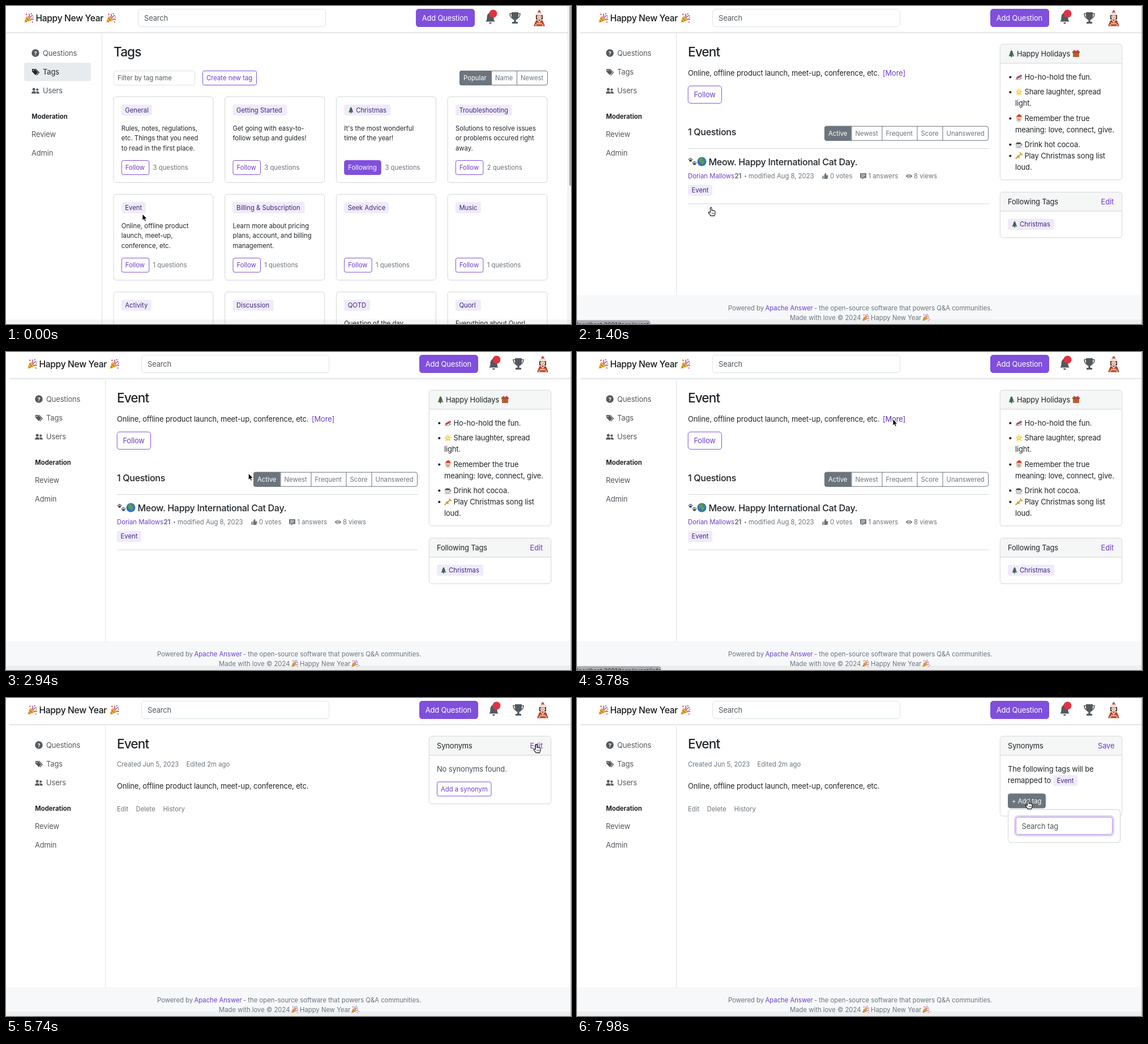
Animation, 998 px wide and 561 px high, one loop 8000 ms. Source, as an HTML page:

```html
<!DOCTYPE html>
<html lang="en">
<head>
<meta charset="utf-8">
<title>Tags and synonyms</title>
<style>
html, body { margin: 0; width: 100%; height: 100%; overflow: hidden; background: #fff; }
svg { display: block; width: 100vw; height: 100vh; font-family: Inter, "Liberation Sans", sans-serif; }
text { white-space: pre; }
</style>
</head>
<body>
<svg id="stage" viewBox="0 0 998 561"></svg>
<script>
const INK = '#212529', GRAY = '#6c757d', NAV = '#54595e', PURPLE = '#7f4fdd', LINK = '#6f3ccb',
  LINE = '#d3d5d7', CHIP = '#f0ebfb', CHIP_INK = '#43277a';
const S = 11.3, M = 12.95, L = 16.1, XL = 22.6;   // text sizes

// ---- drawing helpers ----
const text = (x, y, s, size = M, fill = INK, weight = 400) => {
  const gap = size > 20 ? -.04 : size > 15 ? -.021 : size > 12 ? -.011 : 0;
  return `<text x="${x}" y="${y}" font-size="${size}" fill="${fill}" font-weight="${weight}" letter-spacing="${gap * size}">${s.replace(/&/g, '&amp;')}</text>`;
};
const rect = (x, y, w, h, fill = 'none', stroke = 'none', r = 0, extra = '') =>
  `<rect x="${x}" y="${y}" width="${w}" height="${h}" rx="${r}" fill="${fill}" stroke="${stroke}" ${extra}/>`;
const path = (d, fill = 'none', stroke = 'none', w = 1) =>
  `<path d="${d}" fill="${fill}" stroke="${stroke}" stroke-width="${w}"/>`;
const dot = (x, y, r, fill) => `<circle cx="${x}" cy="${y}" r="${r}" fill="${fill}"/>`;
const at = (x, y, body, k = 1) => `<g transform="translate(${x} ${y}) scale(${k})">${body}</g>`;
const group = (id, body) => `<g id="${id}">${body}</g>`;
const hline = (x, y, w) => rect(x, y, w, 1, LINE);
const chip = (x, y, w, s, inset = 6.5) =>
  rect(x, y, w, 19.5, CHIP, 'none', 3) + text(x + inset, y + 13.7, s, S, CHIP_INK);
const button = (x, y, w, h, s, size = S, full = false) =>
  rect(x + .5, y + .5, w - 1, h - 1, full ? PURPLE : '#fff', PURPLE, size > S ? 4.6 : 3.2) +
  text(x + (size > S ? 10.7 : 7), y + h / 2 + size * .365, s, size, full ? '#fff' : LINK);
const tabs = (y, edges, labels) => {
  const x = edges[0], w = edges[edges.length - 1] - x;
  return rect(x + .5, y + .5, w - 1, 25, '#fff', GRAY, 3.5) +
    path(`M${edges[1]} ${y}H${x + 4}q-4 0-4 4v18q0 4 4 4H${edges[1]}z`, GRAY) +
    labels.map((s, i) => (i ? rect(edges[i], y, 1, 26, GRAY) : '') +
      text(edges[i] + 7, y + 17, s, S, i ? GRAY : '#fff')).join('');
};
const panel = (y, h, head, link, x) =>
  rect(747.3, y + .3, 215.4, h, '#fff', LINE, 5) +
  path(`M747.8 ${y + 34}V${y + 6}q0-5 5-5h204.4q5 0 5 5v28z`, '#f5f6f6') + hline(748, y + 33.5, 215) +
  text(head === 'Happy Holidays' ? 777 : 761, y + 22, head) + (link ? text(x, y + 22, link, M, LINK) : '');

// ---- small pictures, about 16 px, centred on 0,0 ----
const popper = path('M-8 8L-4-3Q2-1 4 4z', '#eeb03a') + path('M-6.5 4l3 3M-5 0l5 5', 'none', '#b9722a', 1.5) +
  path('M-1-1Q2-3 0-7M1 1Q3-4 7-4M3 3Q5 1 8 3', 'none', '#b5508f', 1.5) +
  dot(-4, -6, 1.2, '#e4483f') + dot(4, -7, 1.2, '#3c9bd8') + dot(7, -1, 1.1, '#58b35a') + dot(6, 7, 1.1, '#e4483f');
const tree = path('M0-6.5L2.6-2.5H1.7L3.8.7H2.7L5 4.5H-5L-2.7.7H-3.8L-1.7-2.5H-2.6z', '#2f6b4e') + rect(-1, 4, 2, 2.5, '#80532f') +
  dot(-1, 0, .7, '#e15a4b') + dot(2, 3, .7, '#f4c84c') + dot(0, -6, .9, '#f4c84c');
const gift = rect(-5.5, -2, 11, 8, '#b0692f') + rect(-6.3, -4, 12.6, 3, '#8f5224') + rect(-1.3, -4, 2.6, 10, '#dc3d3d') +
  path('M0-4Q-5-8-4-4zM0-4Q5-8 4-4z', '#dc3d3d', '#dc3d3d');
const sled = path('M-5 1L4-4L6-1L-3 4z', '#c54a42') + path('M-6 4L0 5L6 2M-4 1v4M3-2v5', 'none', '#8494a5', 1.2);
const star = path('M-5-5L5 5M5-5L-5 5M0-7V7M-7 0H7', 'none', '#fbe08a', 1.2) +
  path('M0-5.5L1.8-1.8L5.6-1.2L2.7 1.4L3.6 5.2L0 3.2L-3.6 5.2L-2.7 1.4L-5.6-1.2L-1.8-1.8z', '#f9cb42') + dot(0, 0, 2, '#fff0a3');
const santa = dot(0, 2, 5, '#e3d6cc') + dot(0, 1, 3, '#e3a878') + path('M-5-1Q-3-7 1-7Q5-6 5-1z', '#d8402f') +
  rect(-5.5, -2, 11, 2, '#f3e3d4', '#cfa98a', 1, 'stroke-width=".5"') + path('M-2 3H2', 'none', '#b57c5d');
const cocoa = path('M-5-2H4V1Q4 5 0 5Q-5 5-5 1z', '#d9dadd', '#85888e', .8) + path('M4-1Q8 0 3 3', 'none', '#85888e', 1.2) +
  `<ellipse cx="-.5" cy="-2" rx="4.2" ry="1.6" fill="#5d3828"/>` + path('M-6 6H6', 'none', '#a5a8ae');
const horn = path('M-6 5L3-3L2-6L7-1L4-2L-5 6z', '#d9a72f', '#b88721', .7) + path('M-3 0L1 4', 'none', '#c8942a', 2);
const paws = [[-3.5, -3], [3.5, 3]].map(([x, y]) => at(x, y,
  `<ellipse cy="1.3" rx="2.5" ry="2" fill="#45474a"/>` +
  [[-3, -.7], [-1, -2.4], [1, -2.4], [3, -.7]].map(p => dot(...p, 1, '#45474a')).join(''))).join('');
const globe = dot(0, 0, 8, '#2f74c4') + path('M-3-6Q0-7 3-5L1-3L4-1L4 2L1 6L-1 2L-4 1L-5-3z', '#5f9d4c') + path('M4-5L6-2L4-2z', '#5f9d4c');
const avatar = path('M-6 2V-6Q0-13 6-6V2z', '#2a2426') + dot(0, -2, 4.6, '#f3d1b8') + path('M-5-3Q-4-7 0-7Q4-7 5-3L3-5H-3z', '#2a2426') +
  path('M-5.5-7L-1-14.5H1.5L5.5-7z', '#e9e1df') + path('M-3-10L-1-14H1L3-10z', '#d4483c') + rect(-6.5, -8, 13, 2.5, '#f4eeee', '#d9cdcd', 1.2, 'stroke-width=".5"') +
  path('M-6 4Q0 1 6 4L10 14H-10z', '#b93d35') + path('M-3 3L0 7L3 3', 'none', '#f4e3cf', 1.4) + rect(-5, 8, 10, 3, '#e6b25a') +
  dot(-1.8, -2, .6, '#333') + dot(1.8, -2, .6, '#333') + path('M-1 .5H1', 'none', '#cc6258', .8) +
  dot(-6, 12, 1.2, '#f0d5b5') + dot(6, 12, 1.2, '#f0d5b5');
const bell = path('M0-9.5Q6-8 6-1Q6 5 8.5 6.5H-8.5Q-6 5-6-1Q-6-8 0-9.5zM-2.6 8H2.6Q2 10.4 0 10.4Q-2 10.4-2.6 8z', NAV);
const trophy = path('M-6-10H6V-3Q6 3 0 4Q-6 3-6-3zM-1.7 3h3.4v5h-3.4zM-5 7H5V10H-5z', NAV) +
  path('M-6-7.5H-9Q-8.5-.5-4 .5M6-7.5H9Q8.5-.5 4 .5', 'none', NAV, 1.6);
const help = dot(0, 0, 6.7, NAV) + text(-2.6, 3.6, '?', 9.5, '#fff', 700);
const label = c => path('M-6-5.5H-1.5L4.5 .5L0 5.5L-6-.8z', c) + dot(-3.5, -3, 1, '#fff') + path('M0-5.5L6.4 .7L2 5.5', 'none', c, 1.2);
const people = dot(-2.8, -2.4, 2.5, NAV) + dot(3.2, -2, 2.1, NAV) + path('M-7 5Q-6.5 .8-2.8 .8Q1 .8 1.3 5zM2 5Q2 2.5 1 1.2Q6.5 0 7 5z', NAV);
const thumb = path('M-5-.5H-3V5H-5zM-2-1L0-5.5Q2.5-5.5 1.7-1.5H4.5Q5.5-1 5 .5L3.8 5H-2z', GRAY);
const chat = path('M-5.5-5H5.5V3.5H1L-2 6V3.5H-5.5z', GRAY) + path('M-3.5-2.5H3.5M-3.5-.5H3.5M-3.5 1.5H1', 'none', '#fff', .8);
const eye = path('M-6 0Q0-7 6 0Q0 7-6 0z', GRAY) + dot(0, 0, 2.6, '#fff') + dot(0, 0, 1.5, GRAY);

// ---- page parts ----
const frame = (onTags, foot) =>
  rect(169, 46, 1, foot - 46, '#dfe1e3') + rect(0, 46, 998, 1, '#dcdddf') + rect(0, 47, 998, 2, '#f4f4f4') +
  at(40.5, 21, popper, 1.05) + text(52.5, 26.8, 'Happy New Year', 15.6, '#16181a', 500) + at(185.5, 21, popper, 1.05) +
  rect(233.5, 5.5, 331, 31, '#fff', '#dee2e6', 4.5) + text(244, 26, 'Search', M, NAV) +
  button(724, 5, 104, 32, 'Add Question', M, true) +
  at(855.5, 21, bell) + dot(860.5, 13.5, 7, '#dc3545') + at(899, 21, trophy) + at(942, 21.5, avatar) +
  (onTags ? rect(32, 100, 118, 32.5, '#e8ebee', 'none', 4) : '') +
  at(52, 83, help) + text(65, 88, 'Questions', M, NAV) +
  at(52, 116.5, label(onTags ? INK : NAV)) + text(65, 121, 'Tags', M, onTags ? INK : NAV) +
  at(52, 149.5, people) + text(65, 154, 'Users', M, NAV) +
  text(45.3, 199, 'Moderation', S, INK, 700) + text(45, 231, 'Review', M, NAV) + text(45, 264, 'Admin', M, NAV);

const cards = [
  ['General', 54, 3, 'Rules, notes, regulations,', 'etc. Things that you need', 'to read in the first place.'],
  ['Getting Started', 96, 3, 'Get going with easy-to-', 'follow setup and guides!'],
  ['Christmas', 82, 3, 'It\'s the most wonderful', 'time of the year!'],
  ['Troubleshooting', 100, 2, 'Solutions to resolve issues', 'or problems occured right', 'away.'],
  ['Event', 43, 1, 'Online, offline product', 'launch, meet-up,', 'conference, etc.'],
  ['Billing & Subscription', 127, 1, 'Learn more about pricing', 'plans, account, and billing', 'management.'],
  ['Seek Advice', 79, 1], ['Music', 45, 1], ['Activity', 53, 1], ['Discussion', 72, 1],
  ['QOTD', 46, 1, 'Question of the day'], ['Quorl', 45, 1, 'Everything about Quorl']];
const card = ([name, w, n, ...lines], i) => {
  const x = 190 + i % 4 * 196.7, y = 160 + (i >> 2) * 172.2, on = name === 'Christmas';
  return rect(x, y, 176, 151.5, '#fff', LINE, 5) + chip(x + 13.8, y + 13.8, w, name, on ? 21 : 6.5) +
    (on ? at(x + 26, y + 23.5, tree, .88) : '') +
    lines.map((s, k) => text(x + 13.8, y + 59.8 + 17.4 * k, s, S)).join('') +
    button(x + 13.8, y + 112, on ? 65.5 : 49.5, 26, on ? 'Following' : 'Follow', S, on) +
    text(x + (on ? 86 : 69.6), y + 129.2, n + ' questions', S, GRAY);
};

const tagsPage = frame(true, 561) + text(190, 89, 'Tags', XL, INK, 500) +
  rect(190.5, 114.5, 143, 25, '#fff', '#dee2e6', 3.5) + text(197, 131, 'Filter by tag name', S, NAV) +
  button(347, 114, 96, 26, 'Create new tag') + tabs(114, [801, 857, 902, 957], ['Popular', 'Name', 'Newest']) +
  cards.map(card).join('') +
  group('eventHover', rect(203.8, 346, 43, 19.5, '#e0d6f5', 'none', 3) + text(210.3, 359.7, 'Event', S, CHIP_INK)) +
  rect(992, 0, 6, 561, '#f6f6f6') + rect(992, 0, 1, 561, '#e4e4e4') + rect(995, 0, 3, 317, '#a9a9a9', 'none', 1.5);

const footer = rect(0, 510, 998, 51, '#f6f8fa') +
  text(267, 536.5, 'Powered by', S, GRAY) + text(332.5, 536.5, 'Apache Answer', S, LINK) +
  text(419, 536.5, '- the open-source software that powers Q&A communities.', S, GRAY) +
  text(376, 553.5, 'Made with love © 2024', S, GRAY) + at(510, 549.5, popper, .75) +
  text(519, 553.5, 'Happy New Year', S, GRAY) + at(616, 549.5, popper, .75) + text(622, 553.5, '.', S, GRAY);
const shell = at(6, 0, frame(false, 510)) + footer + rect(997, 0, 1, 561, '#b9b9b9') +
  text(196, 89, 'Event', XL, INK, 500);
const about = 'Online, offline product launch, meet-up, conference, etc.';

const bullets = [[125, sled, 'Ho-ho-hold the fun.'], [151.5, star, 'Share laughter, spread', 'light.'],
  [198, santa, 'Remember the true', 'meaning: love, connect, give.'], [244, cocoa, 'Drink hot cocoa.'],
  [264, horn, 'Play Christmas song list', 'loud.']];
const eventPage = text(196, 122.5, about) +
  `<g id="more">${text(540, 122.5, '[More]', M, 'currentColor')}</g>` +
  button(195.7, 140.5, 60.3, 31.7, 'Follow', M) + text(196, 228, '1 Questions', L, INK, 500) +
  tabs(211.7, [437, 484.5, 538.5, 600.5, 645.5, 727], ['Active', 'Newest', 'Frequent', 'Score', 'Unanswered']) +
  hline(196, 251, 531) + at(204, 274.5, paws) + at(220.5, 274.5, globe) +
  text(232.5, 281, 'Meow. Happy International Cat Day.', L, INK, 500) +
  text(196, 304, 'Dorian Mallows', S, LINK) + text(278.5, 304, '21', S, GRAY, 700) + dot(297.5, 300.5, 1.2, GRAY) +
  text(303, 304, 'modified Aug 8, 2023', S, GRAY) + at(438.5, 300, thumb) + text(447, 304, '0 votes', S, GRAY) +
  at(505.5, 300, chat) + text(514.5, 304, '1 answers', S, GRAY) + at(586.5, 300, eye) + text(595, 304, '8 views', S, GRAY) +
  chip(196, 315.5, 43, 'Event') + hline(196, 348.5, 531) +
  panel(67, 239.5, 'Happy Holidays') + at(767.5, 84, tree) + at(881.5, 84, gift) +
  bullets.map(([y, pic, a, b]) => dot(765.3, y + .5, 2.1, INK) + at(780.5, y, pic) + text(790.5, y + 4.7, a) +
    (b ? text(774, y + 24.7, b) : '')).join('') +
  panel(328, 80.5, 'Following Tags', 'Edit', 925.5) + chip(761, 375.3, 82, 'Christmas', 21) + at(773, 385, tree, .88);

const infoPage = text(196, 120.5, 'Created Jun 5, 2023', S, GRAY) + text(318.5, 120.5, 'Edited 2m ago', S, GRAY) +
  text(196, 160, about) + text(196, 200, 'Edit', S, GRAY) + text(229.5, 200, 'Delete', S, GRAY) + text(277.5, 199.7, 'History', S, GRAY);
const synonyms = panel(67, 119.5, 'Synonyms', 'Edit', 925.5) + text(761, 129.7, 'No synonyms found.', M, '#4a4f54') +
  button(761, 147.5, 96.5, 26, 'Add a synonym');
const editing = panel(67, 141, 'Synonyms', 'Save', 920) + text(761, 129.7, 'The following tags will be') +
  text(761, 149.7, 'remapped to') + chip(841, 135.8, 43, 'Event') +
  rect(761.5, 169, 66, 25, '#fff', GRAY, 3.5, 'id="addBox"') +
  `<g id="addText">${text(768, 185.8, '+ Add tag', S, 'currentColor')}</g>` +
  group('dropdown', rect(761.5, 196.5, 198, 58.5, '#fff', '#cfd1d4', 5) +
    rect(773.5, 208.5, 174, 34, 'none', '#dccff6', 6, 'stroke-width="3"') +
    rect(775.5, 210.5, 170, 30, '#fff', '#b99fec', 4) + text(785.5, 231, 'Search tag', M, NAV));

const status = (w, s) => path(`M0 561V555H${w - 4}q4 0 4 4V561z`, '#abadb5', '#8f9199', .8) + text(0, 566, s, 10.4, '#26282c');

const stage = document.getElementById('stage');
stage.innerHTML = rect(0, 0, 998, 561, '#fff') + group('tags', tagsPage) +
  group('inner', shell + group('event', eventPage) + group('info', infoPage + group('view', synonyms) + group('edit', editing))) +
  rect(0, 553, 998, 8, 'rgba(0,0,0,.04)') +
  group('status1', status(129, 'localhost:3001/tags/event')) + group('status2', status(148, 'localhost:3001/tags/event/info')) +
  group('cursor',
    group('arrow', path('M0 0V11.3L2.6 9L4.3 12.9L6.2 12.1L4.6 8.2H8z', '#000', '#fff', .8)) +
    group('hand', path('M-1.6 8.5V1.2a1.3 1.3 0 0 1 2.6 0V5.2q1.2-.9 2.2.3q1.3-.7 2.1.5q1.6-.3 1.7 1.4V10q0 2.3-1.4 4.6H-.8q-1.4-2.4-3.9-5q-.6-1.6 1-1.5z', '#fff', '#111', 1.1) +
      path('M1.3 9v3M3 9v3M4.7 9v3', 'none', '#111', .6)));

// ---- motion ----
const $ = id => document.getElementById(id);
const clamp = u => Math.max(0, Math.min(1, u));
const ramp = (t, a, b) => clamp((t - a) / (b - a));
const ease = u => u < .5 ? 4 * u ** 3 : 1 - (2 - 2 * u) ** 3 / 2;
const within = (t, a, b) => t >= a && t < b;
const show = (id, on) => $(id).style.display = on ? '' : 'none';
const mix = (a, b, u) => `rgb(${a.map((v, i) => Math.round(v + (b[i] - v) * u))})`;
const WHITE = [255, 255, 255], SLATE = [108, 117, 125];

// start, end, target, optional bend point
const moves = [[70, 560, [237, 355.5]], [2380, 3430, [558, 118.5]],
  [4620, 5740, [937, 82], [756, 158]], [6160, 6510, [797, 181]]];
function cursorAt(t) {
  let p = [241, 367];
  for (const [a, b, to, bend] of moves) {
    if (t < a) break;
    const u = ease(ramp(t, a, b)), from = p;
    p = to.map((v, i) => {
      const c = bend ? bend[i] : (from[i] + v) / 2;
      return (1 - u) ** 2 * from[i] + 2 * u * (1 - u) * c + u * u * v;
    });
  }
  return p;
}

function draw(t) {
  show('tags', t < 1400);
  show('inner', t >= 1400);
  show('event', t < 3920);
  show('info', t >= 3920);
  show('view', t < 6160);
  show('edit', t >= 6160);
  show('dropdown', t >= 7420);
  show('eventHover', t >= 420);
  $('more').style.color = within(t, 3570, 3920) ? '#5930a6' : LINK;

  const fill = ramp(t, 6720, 6930);
  $('addBox').setAttribute('fill', mix(WHITE, SLATE, fill));
  $('addText').style.color = mix(SLATE, WHITE, fill);

  $('status1').style.opacity = ramp(t, 660, 770) - ramp(t, 1750, 1890);
  $('status2').style.opacity = ramp(t, 3640, 3760) - ramp(t, 4130, 4270);

  const hand = within(t, 420, 1750) || within(t, 3850, 4130) || within(t, 5700, 6230) || t >= 6720;
  show('hand', hand);
  show('arrow', !hand);
  $('cursor').setAttribute('transform', `translate(${cursorAt(t)})`);
}

const start = performance.now();
(function loop() {
  draw((performance.now() - start) % 8000);
  requestAnimationFrame(loop);
})();
</script>
</body>
</html>
```
